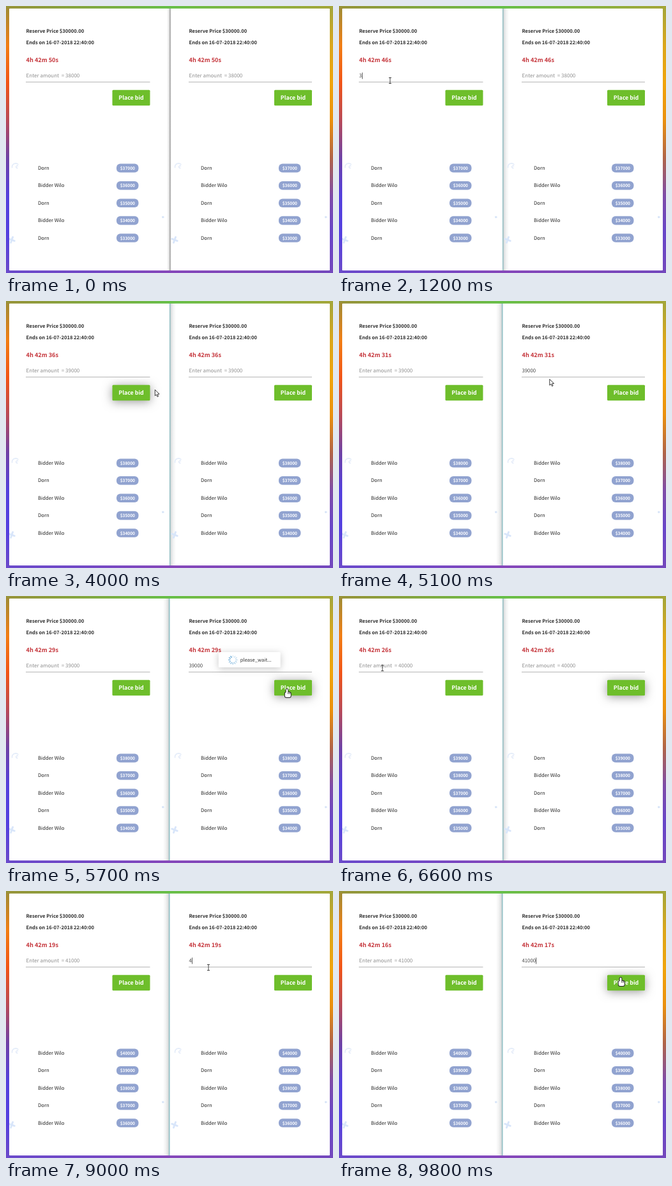
An HTML page with a canvas for the animation above (9.9 s loop, 512 px wide and 419 px high).

```html
<!DOCTYPE html>
<html lang="en">
<head>
<meta charset="utf-8">
<title>Live auction</title>
<style>
html, body { margin: 0; width: 100%; height: 100%; overflow: hidden; background: #fff; }
canvas { display: block; width: 512px; height: 419px; }
</style>
</head>
<body>
<canvas id="stage"></canvas>
<script>
const W = 512, H = 419, LOOP = 9900, STEP = 100;
const FONT = '"Noto Sans CJK SC", "Noto Sans CJK JP", "Noto Sans CJK", "Open Sans", sans-serif';
const canvas = document.getElementById('stage');
const ctx = canvas.getContext('2d');
const dpr = window.devicePixelRatio || 1;
canvas.width = W * dpr;
canvas.height = H * dpr;
if ('textRendering' in ctx) ctx.textRendering = 'geometricPrecision';

const PANELS = [
  { x: 31.5, lineEnd: 225.5, button: 166.5, pill: 173 },
  { x: 286.5, lineEnd: 479, button: 420, pill: 427 }
];
const BUTTON = { y: 131.7, w: 59, h: 24.5 };

// The two bidders take turns: type from `begin`, press the button at `click`.
const FIRST_LEADER = 37, WAIT = 400, ENTRY = [230, 230];
const BIDS = [
  { begin: 1200, click: 2800, field: [80, 117], press: [204, 146] },
  { begin: 4500, click: 5400, field: [317, 120], press: [440, 146] },
  { begin: 6900, click: 7700, field: [68, 113], press: [182, 153] },
  { begin: 8900, click: 9900, field: [317, 120], press: [441, 136] }
].map((bid, i, all) => ({
  ...bid,
  panel: i % 2,
  amount: `${FIRST_LEADER + 1 + i}000`,
  pace: (bid.click - bid.begin) * 0.14,
  focus: bid.begin - 450,
  settled: bid.click + WAIT,
  release: i + 1 < all.length ? all[i + 1].begin : LOOP
}));

// [time, seconds left]
const COUNTDOWN = [[0, 50], [3000, 41], [5100, 31], [7800, 22.4], [9800, 16.9]];

const within = (t, from, to) => t >= from && t < to;
const clamp = k => Math.min(1, Math.max(0, k));
const ease = k => k * k * (3 - 2 * k);
const mix = (a, b, k) => a + (b - a) * k;

function secondsLeft(t) {
  const i = Math.max(1, COUNTDOWN.findIndex(([at]) => at >= t));
  const [[t0, s0], [t1, s1]] = COUNTDOWN.slice(i - 1, i + 1);
  return Math.floor(mix(s0, s1, clamp((t - t0) / (t1 - t0))));
}

// y is the middle of the capital letters
function text(str, x, y, size, color, weight = 400, align = 'left') {
  ctx.font = `${weight} ${size}px ${FONT}`;
  ctx.textAlign = align;
  ctx.fillStyle = color;
  ctx.fillText(str, x, y + size * 0.367);
  return ctx.measureText(str).width;
}

function box(x, y, w, h, r, color, shadow = 0, blur = 0) {
  ctx.save();
  if (shadow) {
    ctx.shadowColor = `rgba(0,0,0,${shadow})`;
    ctx.shadowBlur = blur * dpr;
    ctx.shadowOffsetY = 2 * dpr;
  }
  ctx.fillStyle = color;
  ctx.beginPath();
  ctx.roundRect(x, y, w, h, r);
  ctx.fill();
  ctx.restore();
}

// Colours are spread evenly along the rectangle
function gradientRect(x, y, w, h, vertical, ...colors) {
  const g = vertical ? ctx.createLinearGradient(0, y, 0, y + h) : ctx.createLinearGradient(x, 0, x + w, 0);
  colors.forEach((color, i) => g.addColorStop(i / (colors.length - 1), color));
  ctx.fillStyle = g;
  ctx.fillRect(x, y, w, h);
}

function stroke(color, width, build) {
  ctx.strokeStyle = color;
  ctx.lineWidth = width;
  ctx.beginPath();
  build();
  ctx.stroke();
}

function drawBackdrop() {
  gradientRect(0, 0, W, 5, false, '#98933a', '#83a842', '#68c04a', '#86b443', '#a5a63a');
  gradientRect(0, 414, W, 5, false, '#6a4acb', '#7349c6', '#8648ba', '#7f49bb', '#7348bd');
  gradientRect(0, 3, 6, 412, true, '#a08c35', '#f27e14', '#f25417', '#b84a58', '#6f42a6', '#5440dc', '#5440e0', '#6a4acb');
  gradientRect(506, 3, 6, 412, true, '#a5a63a', '#dba61c', '#f0a40c', '#ea900f', '#b06448', '#7f4ca8', '#6846c8', '#7348bd');
  box(5, 4, 502, 411, 1, '#fff');
}

function drawDecor(panel, index) {
  const x = panel.x - 26.5;
  ctx.save();
  ctx.beginPath();
  ctx.rect(index ? 257 : 5, 4, 250, 411);
  ctx.clip();
  ctx.lineCap = 'round';
  stroke('#e5edf9', 1.8, () => ctx.arc(x + 10, 252.5, 5.5, Math.PI * 0.95, Math.PI * 1.75));
  stroke('#dce6f7', 1.2, () => ctx.arc(x + 12.5, 252.5, 1.8, Math.PI * 0.4, Math.PI * 1.7));
  stroke('#d9e6fa', 3, () => {
    for (const a of [0.35, 1.92]) {
      const dx = 4.5 * Math.cos(a), dy = 4.5 * Math.sin(a);
      ctx.moveTo(x + 4 - dx, 367 - dy);
      ctx.lineTo(x + 4 + dx, 367 + dy);
    }
  });
  box(x + 239, 329.5, 3.5, 3.5, 1.75, '#d8e5f8');
  ctx.restore();
}

// The focused window casts its shadow over the other one
function drawDivider(t) {
  const current = BIDS.filter(b => t >= b.focus).pop();
  if (!current) {
    gradientRect(252, 4, 4, 411, false, 'rgba(0,0,0,0)', 'rgba(0,0,0,.12)');
    gradientRect(255.5, 4, 3, 411, false, '#d6d6d6', '#9c9c9c', '#efefef');
  } else if (current.panel === 0) {
    gradientRect(257, 4, 9, 411, false, 'rgba(40,55,60,.2)', 'rgba(40,55,60,.07)', 'rgba(40,55,60,0)');
    gradientRect(255.5, 4, 2.5, 411, false, '#dceced', '#8fbabf', '#c3d2d4');
  } else {
    gradientRect(246, 4, 9, 411, false, 'rgba(50,60,60,0)', 'rgba(50,60,60,.07)', 'rgba(50,60,60,.2)');
    gradientRect(254.5, 4, 2.5, 411, false, '#b9cccf', '#8fbfc4', '#e2f0f1');
  }
}

function drawDialog(x, t) {
  box(x, 88, 97, 24, 1.5, '#fff', 0.22, 11);
  ctx.save();
  ctx.translate(x + 22.5, 100.3);
  ctx.lineCap = 'butt';
  const spokes = 12, turn = Math.floor(t / STEP) % spokes;
  for (let i = 0; i < spokes; i++) {
    const a = i * 2 * Math.PI / spokes;
    const fade = ((i - turn + spokes) % spokes) / (spokes - 1);
    stroke(`rgba(60,145,205,${0.2 + 0.65 * fade})`, 1.3, () => {
      ctx.moveTo(4 * Math.cos(a), 4 * Math.sin(a));
      ctx.lineTo(7.3 * Math.cos(a), 7.3 * Math.sin(a));
    });
  }
  ctx.restore();
  text('please_wait...', x + 34, 99.8, 7.6, '#333');
}

function drawField(panel, bid, leader, t) {
  const { x, lineEnd } = panel;
  const typed = bid && t < bid.settled ? Math.max(0, Math.floor((t - bid.begin) / bid.pace) + 1) : 0;
  let caretX = x;
  if (typed) caretX += text(bid.amount.slice(0, typed), x, 109.5, 7.75, '#444');
  else text(`Enter amount  = ${leader + 1}000`, x, 109.5, 8.05, '#8e8e8e');

  const editing = bid && within(t, bid.begin - 200, bid.click - 50);
  if (editing && Math.floor(t / 300) % 2 === 0) {
    ctx.fillStyle = '#333';
    ctx.fillRect(caretX + 0.3, 104.5, 0.8, 10);
  }
  ctx.fillStyle = '#b2b2b2';
  ctx.fillRect(x - 0.5, 118.8, lineEnd - x + 0.5, 1);
}

function drawPanel(panel, index, t) {
  const { x, button, pill } = panel;
  const leader = FIRST_LEADER + BIDS.filter(b => t >= b.settled).length;
  const bid = BIDS.filter(b => b.panel === index && t >= b.focus).pop();

  drawDecor(panel, index);
  text('Reserve Price $30000.00', x, 39.5, 7.63, '#2e2e2e', 700);
  text('Ends on 16-07-2018 22:40:00', x, 57.6, 7.62, '#2e2e2e', 700);
  text(`4h 42m ${secondsLeft(t - index * STEP)}s`, x, 85, 9.2, '#c5343a', 700);
  drawField(panel, bid, leader, t);

  const raised = bid && within(t, bid.click - STEP, bid.release);
  box(button, BUTTON.y, BUTTON.w, BUTTON.h, 1.5, '#6ebe2b', raised ? 0.4 : 0, 15);
  text('Place bid', button + BUTTON.w / 2, 144.2, 8.85, '#fff', 700, 'center');

  for (let i = 0; i < 5; i++) {
    const y = 254.4 + i * 27.4, amount = leader - i;
    text(amount % 2 ? 'Dorn' : 'Bidder Wilo', x + 18.5, y - 0.2, 7.7, '#262626', 500);
    box(pill, y - 6.8, 34.5, 13.6, 6, '#91a3d0');
    text(`$${amount}000`, pill + 17.3, y + 0.2, 6.6, '#fff', 700, 'center');
  }
  if (bid && within(t, bid.click, bid.settled)) drawDialog(x + 46.3, t);
}

function drawHand() {
  ctx.beginPath();
  ctx.roundRect(-1.4, 0, 2.8, 9, 1.4);
  ctx.roundRect(-3.2, 5, 9, 8, 2.5);
  ctx.strokeStyle = '#222';
  ctx.lineWidth = 2;
  ctx.stroke();
  ctx.fillStyle = '#fff';
  ctx.fill();
  stroke('#444', 0.7, () => {
    for (let x = 1.4; x < 5; x += 1.6) {
      ctx.moveTo(x, 5);
      ctx.lineTo(x, 8);
    }
  });
}

function drawBeam() {
  stroke('#444', 1, () => {
    for (const y of [-4.5, 4.5]) {
      ctx.moveTo(-2, y);
      ctx.lineTo(2, y);
    }
    ctx.moveTo(0, -4.5);
    ctx.lineTo(0, 4.5);
  });
}

function drawArrow() {
  const shape = new Path2D('M0 0V9.5L2.2 7.6 3.7 11 5.3 10.3 3.8 7 6.8 6.8Z');
  ctx.fillStyle = '#fff';
  ctx.fill(shape);
  ctx.strokeStyle = '#222';
  ctx.lineWidth = 0.9;
  ctx.stroke(shape);
}

// Travels to the field, hides while typing, then travels to the button
function pointerAt(t) {
  const i = BIDS.filter(b => t >= b.begin - 600).length - 1;
  if (i < 0) return null;
  const { begin, click, field, press } = BIDS[i];
  const glide = (a, b, start, length) => a.map((v, n) => mix(v, b[n], ease(clamp((t - start) / length))));
  if (t < begin + 150) return glide(i ? BIDS[i - 1].press : ENTRY, field, begin - 600, 300);
  return t < click - 350 ? null : glide(field, press, click - 350, 250);
}

function drawPointer(t) {
  const point = pointerAt(t);
  if (!point) return;
  const [x, y] = point;
  const onButton = PANELS.some(p => within(x, p.button, p.button + BUTTON.w)) && within(y, BUTTON.y, BUTTON.y + BUTTON.h);
  const onField = PANELS.some(p => within(x, p.x, p.lineEnd)) && within(y, 103, 122);
  ctx.save();
  ctx.translate(x, y);
  (onButton ? drawHand : onField ? drawBeam : drawArrow)();
  ctx.restore();
}

function render(now) {
  const t = Math.floor((now % LOOP) / STEP) * STEP;
  ctx.setTransform(dpr, 0, 0, dpr, 0, 0);
  drawBackdrop();
  drawDivider(t);
  PANELS.forEach((panel, index) => drawPanel(panel, index, t));
  drawPointer(t);
}

const start = performance.now();
function tick() {
  render(performance.now() - start);
  requestAnimationFrame(tick);
}
tick();
</script>
</body>
</html>
```
